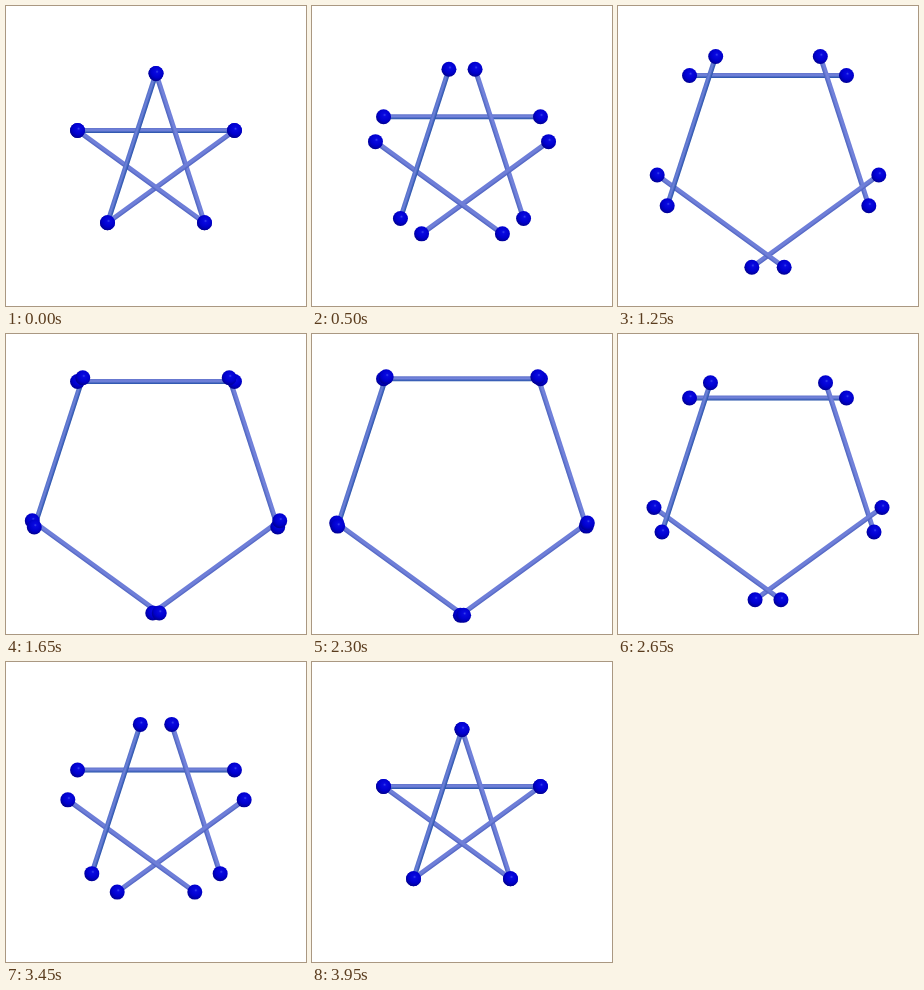
Recreate the animation shown at these times as an HTML page. Size 300 px wide and 300 px high, loop 4000 ms.

```html
<!DOCTYPE html>
<html lang="en">
<head>
<meta charset="utf-8">
<title>Star and pentagon</title>
<style>
  html, body { margin: 0; width: 100%; height: 100%; overflow: hidden; background: #fff; }
  svg { display: block; width: 100vw; height: 100vh; }
</style>
</head>
<body>
<svg viewBox="0 0 300 300">
  <defs>
    <radialGradient id="ball" cx=".57" cy=".38" r=".66">
      <stop offset="0" stop-color="#3a46ea"/>
      <stop offset=".16" stop-color="#0808e0"/>
      <stop offset=".6" stop-color="#0000cc"/>
      <stop offset="1" stop-color="#000088"/>
    </radialGradient>
  </defs>
  <g id="rods"></g>
  <g id="balls"></g>
</svg>
<script>
const LOOP = 4000, STEP = 50, HOLD = 250, TRAVEL = 1500;
const CENTER = 150, RADIUS = 82.5, BALL = 7.5, THICK = 5;
const TURN = Math.PI * 2 / 5;
const HALF = RADIUS * Math.sin(TURN);
const INNER = RADIUS * Math.cos(TURN);
const OUTER = HALF / Math.tan(TURN / 2);

// Rod shading from the outer to the inner edge, clockwise from the top rod.
const SHADES = [
  ['#6274cc', '#7484dc', '#2450a8'],
  ['#6c7cd8', '#7484dc', '#4860bc'],
  ['#4c60c0', '#7080d8', '#6c7cd8'],
  ['#4c60c0', '#7080d8', '#6c7cd8'],
  ['#5470c8', '#6c80d8', '#2450a8']
];

function add(parent, name, attributes) {
  const node = document.createElementNS('http://www.w3.org/2000/svg', name);
  for (const key in attributes) node.setAttribute(key, attributes[key]);
  return parent.appendChild(node);
}

const defs = document.querySelector('defs');
const rodLayer = document.getElementById('rods');
const ballLayer = document.getElementById('balls');

const rods = SHADES.map((colors, i) => {
  const gradient = add(defs, 'linearGradient', { id: 'rod' + i, x1: 0, y1: 0, x2: 0, y2: 1 });
  colors.forEach((color, n) =>
    add(gradient, 'stop', { offset: [0, 0.45, 1][n], 'stop-color': color }));
  return {
    angle: i * TURN,
    bar: add(rodLayer, 'rect', {
      x: -HALF, width: HALF * 2, height: THICK, fill: `url(#rod${i})`,
      transform: `translate(${CENTER} ${CENTER}) rotate(${i * 72})`
    }),
    ends: [-1, 1].map(side => ({
      side,
      node: add(ballLayer, 'circle', { r: BALL, fill: 'url(#ball)' })
    }))
  };
});

function draw(time) {
  const t = Math.floor((time % LOOP) / STEP) * STEP;
  const half = Math.min(t, LOOP - t);
  const progress = Math.min(1, Math.max(0, (half - HOLD) / TRAVEL));
  const distance = INNER + (OUTER - INNER) * progress;

  for (const { angle, bar, ends } of rods) {
    const sin = Math.sin(angle), cos = Math.cos(angle);
    bar.setAttribute('y', -distance - THICK / 2);
    for (const { side, node } of ends) {
      node.setAttribute('cx', CENTER + side * HALF * cos + distance * sin);
      node.setAttribute('cy', CENTER + side * HALF * sin - distance * cos);
    }
  }
}

const start = performance.now();
function tick() {
  draw(performance.now() - start);
  requestAnimationFrame(tick);
}
tick();
</script>
</body>
</html>
```
